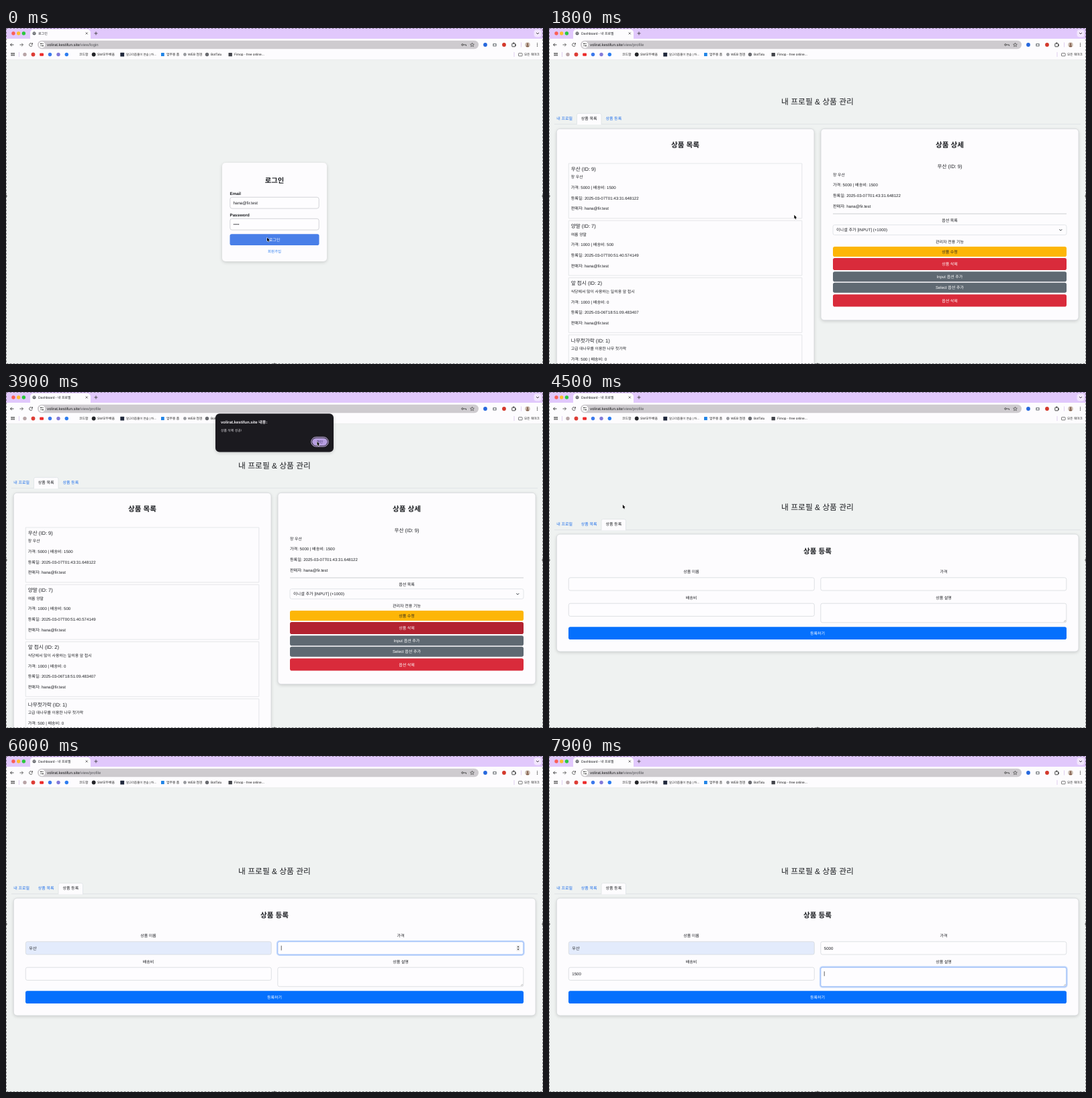
An HTML page with a canvas for the animation above (8 s loop, 800x501 px).

```html
<!DOCTYPE html>
<html lang="ko">
<head>
<meta charset="utf-8">
<title>상품 관리</title>
<style>
html, body { margin: 0; width: 100%; height: 100%; overflow: hidden; background: #eff2f1; }
canvas { display: block; width: 800px; height: 501px; }
</style>
</head>
<body>
<canvas id="stage"></canvas>
<script>
const W = 800, H = 501, LOOP = 8000;
const FONT = '"Liberation Sans", "Noto Sans CJK KR", "Noto Sans CJK JP", sans-serif';
const HOST = 'volirat.kestifun.site', EMAIL = 'hana@fir.test';
const INK = '#1d1f23', LINK = '#1f6fea', PAPER = '#fdfcfe', LINE = '#d3d7da';

const canvas = document.getElementById('stage');
const dpr = window.devicePixelRatio || 1;
canvas.width = W * dpr;
canvas.height = H * dpr;
const c = canvas.getContext('2d');
c.scale(dpr, dpr);
c.textRendering = 'geometricPrecision';

// Moments of the story, in ms
const AT = { list: 400, detail: 1300, alert: 3000, close: 4000, reload: 4100, form: 4400,
  name: 4700, pick: 5750, price: 5900, typePrice: 6600, ship: 6900, typeShip: 7100, note: 7800 };

// Pointer stops: time, x, y
const PATH = [[300, 389, 312.5], [560, 61, 133], [680, 61, 133], [850, 64, 221], [1500, 64, 221],
  [2050, 592, 322], [2250, 592, 326], [2550, 588.5, 351], [3100, 588.5, 351], [3650, 463.5, 74],
  [4000, 463.5, 74], [4300, 96, 133], [4420, 96, 133], [4680, 156, 284.5], [5300, 156, 284.5],
  [5600, 84, 334]];

const ITEMS = [
  ['우산', 9, '장 우산', 5000, 1500, '2025-03-07T01:43:31.648122'],
  ['양말', 7, '여름 양말', 1000, 500, '2025-03-07T00:51:40.574149'],
  ['앞 접시', 2, '식당에서 많이 사용하는 일히용 앞 접시', 1000, 0, '2025-03-06T18:51:09.483407'],
  ['나무젓가락', 1, '고급 대나무를 이용한 나무 젓가락', 500, 0, '2025-03-06T18:49:22.107365']
];

function text(s, x, y, size = 6.1, color = INK, align = 'left', weight = 500) {
  c.font = `${weight} ${size}px ${FONT}`;
  c.fillStyle = color;
  c.textAlign = align;
  c.fillText(s, x, y + size * 0.36);
  return c.measureText(s).width;
}
const mid = (s, x, y, size, color, weight) => text(s, x, y, size, color, 'center', weight);

function box(x, y, w, h, r, fill, stroke, lw = 0.8) {
  c.beginPath();
  c.roundRect(x, y, w, h, r);
  if (fill) { c.fillStyle = fill; c.fill(); }
  if (stroke) { c.strokeStyle = stroke; c.lineWidth = lw; c.stroke(); }
}

function dot(x, y, r, fill, stroke, lw = 0.8) {
  box(x - r, y - r, 2 * r, 2 * r, r, fill, stroke, lw);
}

function line(pts, color = '#444', lw = 0.9) {
  c.beginPath();
  pts.forEach(([x, y]) => c.lineTo(x, y));
  c.strokeStyle = color;
  c.lineWidth = lw;
  c.stroke();
}

function card(x, y, w, h, r = 5, fill = PAPER, stroke = LINE) {
  c.save();
  c.shadowColor = 'rgba(0,0,0,.16)';
  c.shadowBlur = 5 * dpr;
  c.shadowOffsetY = 1.5 * dpr;
  box(x, y, w, h, r, fill);
  c.restore();
  if (stroke) box(x, y, w, h, r, null, stroke);
}

function button(s, x, y, w, h, fill, color = '#fff') {
  box(x, y, w, h, 2.8, fill);
  mid(s, x + w / 2, y + h / 2, 6, color);
}

function drawTabStrip(title) {
  c.fillStyle = '#e1c8fc';
  c.fillRect(0, 0, W, 17);
  ['#fb5f57', '#fdbc2e', '#2bc840'].forEach((col, i) => dot(11 + i * 7.7, 8, 2.7, col));
  box(36, 2, 90, 17, [5, 5, 0, 0], PAPER);
  dot(42, 8, 2.5, '#62656a');
  line([[40.5, 7.2], [42, 8.2], [43.5, 7]], '#fff', 0.7);
  text(title, 48, 8, 5);
  line([[118.7, 6.5], [121.7, 9.5]], '#333', 0.7);
  line([[121.7, 6.5], [118.7, 9.5]], '#333', 0.7);
  line([[131.5, 8], [136.5, 8]], '#333', 0.8);
  line([[134, 5.5], [134, 10.5]], '#333', 0.8);
  box(786.5, 2.5, 11, 11, 4, '#f2e6fe');
  line([[790, 7], [792, 9], [794, 7]], '#333');
}

function drawToolbar(path) {
  c.fillStyle = PAPER;
  c.fillRect(0, 16, W, 31.5);
  for (const [x, d, col] of [[9, -1, '#333'], [23, 1, '#555']]) {
    line([[x - 2.5, 25], [x + 2.5, 25]], col);
    line([[x + d * .3, 22.8], [x + d * 2.5, 25], [x + d * .3, 27.2]], col);
  }
  c.beginPath();
  c.arc(37, 25, 2.4, 0.3, 5.6);
  c.stroke();
  line([[39.5, 22.2], [39.5, 24.2], [37.5, 24.2]], '#444');
  box(47, 18.8, 657, 12.4, 6.2, '#cecbcf');
  dot(53.5, 25, 4.7, '#fff');
  line([[51, 23.5], [56, 23.5]], '#444', 0.7);
  line([[51, 26.5], [56, 26.5]], '#444', 0.7);
  dot(52, 23.5, 0.9, '#444');
  dot(55, 26.5, 0.9, '#444');
  const w = text(HOST, 61, 25, 5.95, '#1b1b1e');
  text(path, 61 + w, 25, 5.95, '#55555a');
  dot(680, 25, 1.3, null, '#444');
  line([[681.3, 25], [685.5, 25], [685.5, 26.8]], '#444');
  c.beginPath();
  for (let i = 0; i < 10; i++) {
    const a = i * Math.PI / 5 - Math.PI / 2, r = i % 2 ? 1.4 : 3;
    c.lineTo(694.5 + r * Math.cos(a), 25.2 + r * Math.sin(a));
  }
  c.closePath();
  c.lineWidth = 0.7;
  c.stroke();
  dot(714, 25, 2.9, '#2668dd');
  box(725.2, 23, 5.6, 4.4, 1, '#85898d');
  dot(728, 25.2, 1.2, '#fff');
  dot(742, 25, 2.9, '#d3382b');
  box(753.8, 23, 5, 4.8, 0.7, null, '#333', 0.9);
  dot(756.3, 22.6, 1, '#333');
  dot(759, 25.4, 1, '#333');
  line([[767.5, 21.5], [767.5, 28.5]], '#dcc9ee');
  dot(777, 25, 3.8, '#cfc2b6');
  dot(777, 24, 1.4, '#84604f');
  box(775, 25.6, 4, 2.6, [2, 2, 1, 1], '#84604f');
  for (const y of [22.8, 25, 27.2]) dot(791.5, y, 0.65, '#333');
}

function drawBookmarks() {
  for (let i = 0; i < 6; i++) box(7.5 + i % 3 * 2, 37 + (i / 3 | 0) * 2.6, 1.4, 1.8, 0.2, '#444');
  line([[19.5, 36], [19.5, 43]], '#dcc9ee');
  dot(28, 39.5, 2.7, '#b8a4a6');
  dot(40.5, 39.5, 2.9, '#dd3c35');
  box(50.2, 37.4, 5.8, 4.4, 1, '#ec2a2a');
  dot(65.5, 39.5, 2.7, '#3c79ec');
  dot(78, 39.5, 2.7, '#8279d8');
  dot(90.3, 39.5, 2.7, '#2d7df0');
  dot(130.7, 39.5, 2.9, '#242529');
  box(170.3, 36.7, 5.8, 5.8, 0.5, '#20283c');
  box(231, 37, 4.8, 5, 0.5, '#2184e6');
  dot(266.5, 39.5, 2.4, '#97999e');
  dot(299.5, 39.5, 2.7, '#696b70');
  box(331.5, 37, 5.4, 5.2, 0.5, '#43454b');
  [['코드함', 109], ['SW모두배움', 136], ['알고리즘풀이 연습 | 하...', 179], ['업무용 홈', 239],
    ['WEB 점검', 271], ['BotTalu', 305], ['Fimop - free online...', 340]]
    .forEach(([s, x]) => text(s, x, 39.5, x === 179 ? 4.4 : 4.9, '#222'));
  line([[757, 36], [757, 43]], '#dcc9ee');
  box(763.5, 37.6, 5.6, 4.2, 0.7, null, '#444', 0.7);
  text('모든 북마크', 772, 39.5, 4.7, '#222');
  line([[0, 47.3], [W, 47.3]], '#dfe1e2', 0.6);
}

function drawLogin() {
  card(322, 201, 156, 147, 5, PAPER, null);
  mid('로그인', 400, 227.5, 10.3, INK, 700);
  text('Email', 333.5, 246.5, 6.2, INK, 'left', 700);
  box(333.8, 252.3, 132.4, 16.8, 3, '#fefdff', '#c9cbce');
  text(EMAIL, 338.5, 260.7, 6.2);
  text('Password', 333.5, 278.5, 6.2, INK, 'left', 700);
  box(333.8, 284.3, 132.4, 16.8, 3, '#fefdff', '#c9cbce');
  for (let i = 0; i < 4; i++) dot(339.8 + i * 2.2, 292.8, 0.8, INK);
  button('로그인', 333.5, 307.2, 133, 16.8, '#497fe8');
  mid('회원가입', 400, 333, 5.4, '#2a7cf0');
}

// Page heading and the three tabs
function drawHead(dy, active) {
  mid('내 프로필 & 상품 관리', 400, 109.5 + dy, 11.8, INK, 400);
  line([[8, 143.3 + dy], [792, 143.3 + dy]], '#dee2e5');
  const x = active === 1 ? 41.5 : 78;
  box(x, 127.3 + dy, 36.5, 16.5, [2.5, 2.5, 0, 0], PAPER, '#dee2e5');
  c.fillStyle = PAPER;
  c.fillRect(x + 0.4, 142.8 + dy, 35.7, 1.4);
  ['내 프로필', '상품 목록', '상품 등록'].forEach((s, i) =>
    text(s, 11.2 + i * 36.6, 135 + dy, 6, i === active ? INK : LINK));
}

function drawFacts([, , desc, price, ship, date], x, y) {
  text(desc, x, y, 5.9);
  text(`가격: ${price} | 배송비: ${ship}`, x, y + 15.8);
  text(`등록일: ${date}`, x, y + 31.4);
  text(`판매자: ${EMAIL}`, x, y + 47);
}

function drawDetail(t) {
  const item = ITEMS[0];
  mid(`${item[0]} (ID: ${item[1]})`, 597, 206.3, 7.6);
  drawFacts(item, 423, 218.5);
  line([[423, 277], [771, 277]], '#bfc2c5', 0.8);
  mid('옵션 목록', 597, 287, 6);
  box(423, 293.6, 348, 15, 2.6, PAPER, '#dce0e4');
  text('이니셜 추가 [INPUT] (+1000)', 428, 301.2);
  line([[760.4, 300.2], [762.3, 302.2], [764.2, 300.2]], '#343a40', 1);
  mid('관리자 전용 기능', 597, 318.7, 6);
  const red = '#d92b3b';
  const del = t < 2450 ? red : t < 2750 ? '#b93b47' : '#b32331';
  button('상품 수정', 423, 326, 348, 15, '#fdb607', '#222');
  button('상품 삭제', 423, 343, 348, 18, del);
  button('Input 옵션 추가', 423, 363.2, 348, 15, '#5f6972');
  button('Select 옵션 추가', 423, 379.8, 348, 15, '#5f6972');
  button('옵션 삭제', 423, 397.2, 348, 18.4, red);
}

function drawList(t) {
  const open = t >= AT.detail && t < AT.reload;
  const items = t < AT.reload ? ITEMS : ITEMS.slice(1);
  drawHead(0, 1);
  card(11.3, 150.3, 383.7, 52 + items.length * 85.2 + 14);
  mid('상품 목록', 203, 174.5, 10.6, INK, 700);
  items.forEach((item, i) => {
    const y = 202 + i * 85.2;
    box(29.3, y, 347.5, 81.8, 0, null, '#dfe1e4', 0.8);
    text(`${item[0]} (ID: ${item[1]})`, 32.7, y + 8.2, 7.6);
    drawFacts(item, 32.7, y + 20.2);
  });
  card(405, 150.3, 384, open ? 285.4 : 85.4);
  mid('상품 상세', 597, 174.5, 10.6, INK, 700);
  if (open) drawDetail(t);
  else text('상품을 선택하면 상세 정보가 표시됩니다.', 423, 206, 5.9);
}

function drawAlert() {
  card(312, 32.3, 176, 57.2, 6, '#1b1a1f', null);
  text(HOST + ' 내용:', 320, 45.3, 6, '#f0eef2', 'left', 600);
  text('상품 삭제 성공!', 320, 57.5, 4.9, '#e4e2e7');
  box(454.8, 67.3, 25.4, 14, 7, '#1b1a1f', '#d5bff3', 1);
  box(456.2, 68.7, 22.6, 11.2, 5.6, '#b79fe0');
  mid('확인', 467.5, 74.3, 4.9, '#33205c');
}

function drawField(x, y, h, value, focus, caret, fill = '#fefdff') {
  if (focus) box(x - 0.4, y - 0.4, 366.8, h + 0.8, 3, null, '#c4d9fc', 3);
  box(x, y, 366, h, 2.6, fill, focus ? '#86aef5' : '#d6dade');
  const w = text(value, x + 5, y + 9.7, 6.1);
  if (caret) line([[x + 5.4 + w, y + 6], [x + 5.4 + w, y + 13]], '#222', 0.7);
}

function drawSpinner(x, y) {
  box(x - 2.8, y - 4.5, 5.6, 9, 1, '#efeff1');
  for (const d of [-1, 1]) {
    c.beginPath();
    c.moveTo(x - 1.5, y + d * 1.2);
    c.lineTo(x + 1.5, y + d * 1.2);
    c.lineTo(x, y + d * 3.2);
    c.fillStyle = '#333';
    c.fill();
  }
}

function drawSuggestions(t) {
  c.beginPath();
  c.moveTo(72.5, 300.5);
  c.lineTo(76, 296.6);
  c.lineTo(79.5, 300.5);
  c.fillStyle = '#1c1b20';
  c.fill();
  card(68, 300, 61, 45, 2.5, '#1c1b20', null);
  if (t > 5520) box(68, 330, 61, 13, 0, '#3a393f');
  ['양말', '양말 2', '우산'].forEach((s, i) => text(s, 72.5, 308.5 + i * 14, 4.8, '#f1eff4'));
}

const typed = (s, t, from, step) => s.slice(0, Math.max(0, Math.floor((t - from) / step) + 1));

function drawForm(t) {
  const focus = ['note', 'ship', 'price', 'name'].find(k => t >= AT[k]);
  let since = AT[focus];
  if (focus === 'price' && t >= AT.typePrice) since = AT.typePrice;
  if (focus === 'ship' && t >= AT.typeShip) since = AT.typeShip + 390;
  const blink = t < since || (t - since) % 1000 < 500;
  const field = (key, x, y, h, value, fill) =>
    drawField(x, y, h, value, focus === key, focus === key && blink, fill);
  const picked = t >= AT.pick;

  drawHead(62.3, 2);
  card(11.3, 212, 777.7, 175);
  mid('상품 등록', 400, 237, 10.6, INK, 700);
  mid('상품 이름', 212, 268.3, 6);
  mid('가격', 588, 268.3, 6);
  mid('배송비', 212, 307, 6);
  mid('상품 설명', 588, 307, 6);
  field('name', 29.3, 276.8, 19.2, picked ? '우산' : '', picked ? '#e3ebfc' : undefined);
  field('price', 404.8, 276.8, 19.2, typed('5000', t, AT.typePrice, 75));
  field('ship', 29.3, 315.2, 19.2, typed('1500', t, AT.typeShip, 130));
  field('note', 404.8, 315.2, 28.6, '');
  if (focus === 'price') drawSpinner(763, 286.4);
  if (focus === 'ship') drawSpinner(387.5, 324.8);
  line([[767, 342.6], [769.6, 340]], '#888', 0.6);
  line([[768.5, 342.8], [769.8, 341.5]], '#888', 0.6);
  button('등록하기', 29, 350.2, 742, 18.8, '#0570fd');
  if (focus === 'name' && !picked) drawSuggestions(t);
}

function drawPointer(t) {
  if (t >= AT.price) return;
  const n = PATH.findIndex(p => p[0] > t);
  let [, x, y] = PATH[n < 0 ? PATH.length - 1 : n];
  if (n > 0) {
    const [t0, x0, y0] = PATH[n - 1];
    const u = (t - t0) / (PATH[n][0] - t0), k = u * u * (3 - 2 * u);
    x = x0 + (x - x0) * k;
    y = y0 + (y - y0) * k;
  }
  c.beginPath();
  [[0, 0], [0, 5.6], [1.2, 4.5], [2.1, 6.5], [3, 6.1], [2.2, 4.2], [3.8, 4.1]]
    .forEach(([dx, dy]) => c.lineTo(x + dx, y + dy));
  c.closePath();
  c.strokeStyle = '#fff';
  c.lineWidth = 1;
  c.stroke();
  c.fillStyle = '#000';
  c.fill();
}

function drawEdge() {
  c.setLineDash([3, 2]);
  c.strokeStyle = 'rgba(70,70,74,.65)';
  c.lineWidth = 1;
  c.strokeRect(0.5, 0.5, W - 1, H - 1);
  c.setLineDash([]);
  dot(0, 250.5, 1.6, '#555');
  dot(W, 250.5, 1.6, '#555');
  dot(400, H, 1.6, '#555');
}

function draw(t) {
  const login = t < AT.list;
  c.fillStyle = '#eff2f1';
  c.fillRect(0, 0, W, H);
  if (login) drawLogin();
  else if (t < AT.form) drawList(t);
  else drawForm(t);
  drawTabStrip(login ? '로그인' : 'Dashboard - 내 프로필');
  drawToolbar(login ? '/view/login' : '/view/profile');
  drawBookmarks();
  if (t >= AT.alert && t < AT.close) drawAlert();
  drawEdge();
  drawPointer(t);
}

const start = performance.now();
function tick() {
  draw((performance.now() - start) % LOOP);
  requestAnimationFrame(tick);
}
tick();
</script>
</body>
</html>
```
